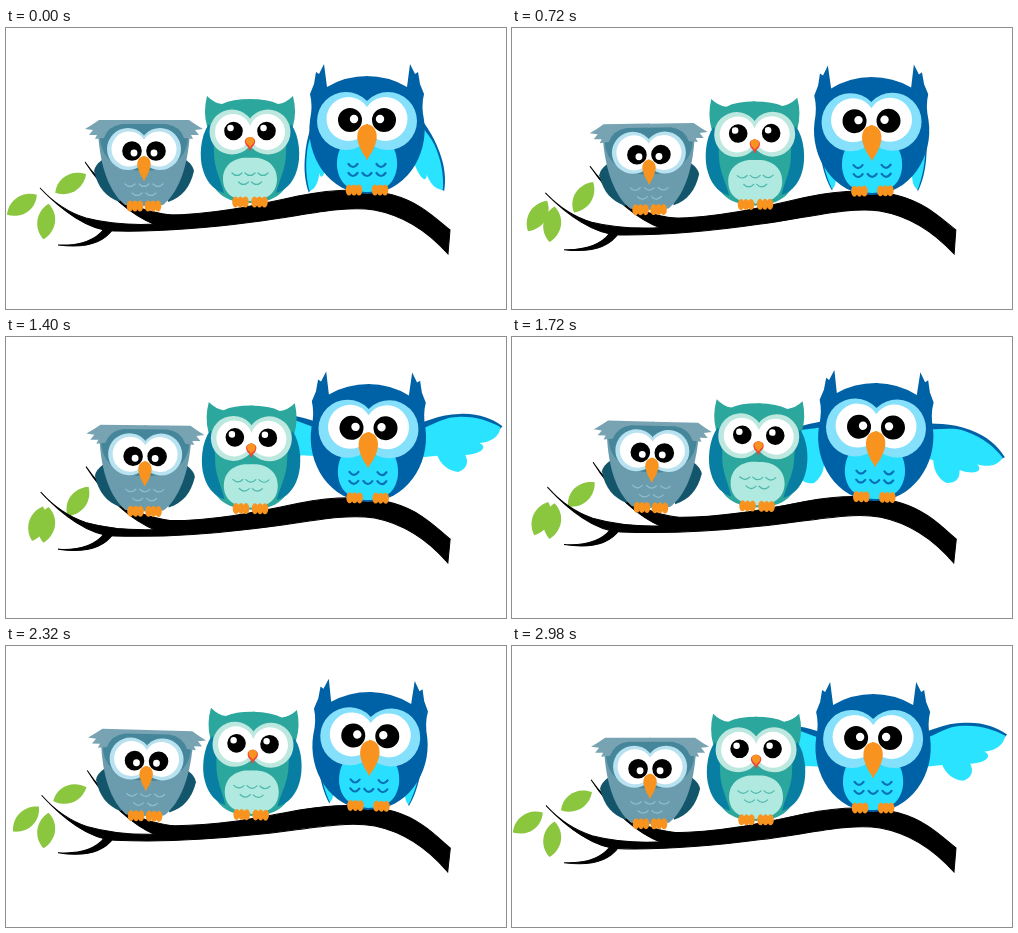
An HTML page that plays this animation: 500x281 px, repeating every 3000 ms.

```html
<!DOCTYPE html>
<html lang="en">
<head>
<meta charset="utf-8">
<title>Owls on a branch</title>
<style>
html, body { margin: 0; width: 100%; height: 100%; overflow: hidden; background: #fff; }
svg { display: block; width: 100vw; height: 100vh; }
</style>
</head>
<body>
<svg viewBox="0 0 500 281">
  <defs>
    <path id="leaf" d="M-18 0C-9-12 8-12 18 0C8 12-9 11-18 0Z" fill="#8bc63f"/>
    <g id="wing">
      <path d="M-10-2C4-6 20-15 40-15C58-16 72-11 83-3L75 6H-10Z" fill="#0062a6"/>
      <path d="M-10 2C8 2 20-12 38-12C56-13 70-8 81-2C80 7 72 13 60 14C68 17 64 25 46 26C50 34 47 40 39 43C29 42 22 36 18 27L-10 30Z" fill="#29e3ff"/>
    </g>
  </defs>
  <g id="leaves"></g>
  <g id="sway">
    <g stroke="#000">
      <path d="M34 160C47 174 61 184 80 190C103 196 130 197 150 196L160 187C205 187 247 178 292 168C326 161 361 160 387 167C413 174 428 189 444 202L442 226C425 207 401 188 368 182C335 177 292 189 247 194C202 200 153 204 108 203C83 203 55 182 34 160Z"/>
      <path d="M79 134C88 147 97 156 110 166C126 179 142 184 165 187L150 197C126 188 100 166 79 134Z"/>
      <path d="M107 201C98 214 82 221 52 217C77 218 91 210 98 201Z"/>
    </g>
    <g id="wingL"><use href="#wing"/></g>
    <g id="wingR"><use href="#wing"/></g>
    <g id="small" transform="translate(138)"></g>
    <g id="middle" transform="translate(244)"></g>
    <g id="big" transform="translate(361)"></g>
  </g>
</svg>
<script>
const LOOP = 3000, TAU = Math.PI * 2;
const AXIS = 361;
const $ = id => document.getElementById(id);

function add(parent, tag, attrs) {
  const el = document.createElementNS("http://www.w3.org/2000/svg", tag);
  for (const key in attrs) el.setAttribute(key, attrs[key]);
  parent.appendChild(el);
  return el;
}
const disc = (g, cx, cy, r, fill) => add(g, "circle", { cx, cy, r, fill });
const shape = (g, d, fill) => add(g, "path", { d, fill });

// Each owl is drawn around x = 0 from right-hand halves
function both(g, d, fill) {
  [1, -1].forEach(side => shape(g, d, fill).setAttribute("transform", `scale(${side} 1)`));
}
function eyes(g, gap, y, r, fill) {
  [-gap, gap].forEach(x => disc(g, x, y, r, fill));
}
function pupils(g, gap, y, r, shineX, shineY) {
  eyes(g, gap, y, r, "#000");
  [-1, 1].forEach(side => disc(g, side * gap + shineX(side), y + shineY, r * 0.35, "#fff"));
}
function arcs(g, count, gap, y, w, h, stroke, width) {
  let d = "";
  for (let i = 0; i < count; i++) {
    d += `M${(i - (count - 1) / 2) * gap - w} ${y}q${w} ${h} ${2 * w} 0`;
  }
  add(g, "path", { d, fill: "none", stroke, "stroke-width": width, "stroke-linecap": "round" });
}
function feet(g, gap, y) {
  for (const side of [-1, 1]) {
    for (const toe of [-5, 0, 5]) {
      add(g, "ellipse", { cx: side * gap + toe, cy: y, rx: 3.3, ry: 5.5, fill: "#f7931e" });
    }
  }
}

function drawSmall(g) {
  both(g, "M42 132Q49 137 50 143C46 160 38 169 24 174L22 148Z", "#13566b");
  both(g, "M-1 97L46 104C44 140 34 165 19 177L-1 178Z", "#6a9cad");
  both(g, "M-1 95H38Q43 97 44 110C43 128 30 143-1 143Z", "#45869b");
  both(g, "M-1 92H45Q52 97 59 101L51 102L55 107L47 107L49 111L40 110Q36 98 22 96H-1Z", "#78a3b3");
  eyes(g, 16, 121, 21, "#b9e2f0");
  eyes(g, 15, 121, 17.5, "#fff");
  pupils(g, 12, 123, 9.8, side => -2 * side, 2);
  both(g, "M-1 128C6 128 8 135 6 140Q4 148-1 153Z", "#f7931e");
  arcs(g, 3, 14, 156, 5, 5, "#8fbdd0", 1.2);
  arcs(g, 2, 14, 165, 5, 5, "#8fbdd0", 1.2);
  feet(g, 9, 178);
}

function drawMiddle(g) {
  both(g, "M-1 71Q18 71 28 76Q36 75 43 68Q47 84 43 98C40 108 41 118 41 137C41 163 26 175-1 175Z", "#2ca79d");
  both(g, "M41 96C50 108 51 130 47 142C43 156 34 163 26 165C30 150 36 140 36 125Q36 108 41 96Z", "#087fa2");
  both(g, "M-1 130C14 128 27 136 27 151C27 165 17 173-1 173Z", "#b0e9e0");
  eyes(g, 18, 104, 22.5, "#bde8df");
  eyes(g, 17, 104, 18, "#fff");
  pupils(g, 16.5, 103, 9.3, () => -3, -3);
  both(g, "M-1 109C6 109 6 114 4 117L-1 123Z", "#f04438");
  both(g, "M-1 109C5 109 5 113 3 116L-1 119Z", "#f7931e");
  arcs(g, 3, 13, 145, 5, 5, "#4db8ac", 1.2);
  arcs(g, 2, 13, 154, 5, 5, "#4db8ac", 1.2);
  feet(g, 9.5, 174);
}

function drawBig(g) {
  both(g, "M-1 48Q22 48 40 59L43 36L48 46L51 44L53 56L57 66Q54 78 57 92C62 128 38 166-1 166Z", "#0062a6");
  both(g, "M-1 109C22 107 31 120 30 139C28 156 17 164-1 164Z", "#29dfff");
  eyes(g, 21, 93, 29, "#85e0fb");
  eyes(g, 18.5, 91, 22, "#fff");
  const open = add(g, "g", {}), shut = add(g, "g", {});
  pupils(open, 17, 92, 12, side => -4 * side, -1);
  eyes(shut, 19, 91, 23, "#fff");
  arcs(shut, 2, 38, 89, 10, -15, "#111", 1.4);
  both(g, "M-1 96C9 97 11 106 9 114Q6 125-1 132Z", "#f7931e");
  arcs(g, 2, 28, 136, 4.5, 6, "#0870b4", 2.2);
  arcs(g, 3, 14, 145, 4.5, 6, "#0870b4", 2.2);
  feet(g, 13, 162);
  return { open, shut };
}

const wave = (t, mid, amp, delay) => mid + amp * Math.sin(TAU * (t - delay) / LOOP);

// Each leaf circles slowly: x, y, angle
const swings = [
  t => [wave(t, 68, 5, 350), wave(t, 159, 11, 150), wave(t, -41, -20, 250)],
  t => [wave(t, 23.5, 8, 600), wave(t, 181, 8.5, 250), wave(t, 127, -20, 600)],
  t => [40, wave(t, 190, 7, -250), 98]
];
const leaves = swings.map(() => add($("leaves"), "use", { href: "#leaf" }));

drawSmall($("small"));
drawMiddle($("middle"));
const { open, shut } = drawBig($("big"));

function wingPose(raise) {
  const spread = Math.min(1, raise / 0.6);
  const angle = 101 - 110 * raise;
  return `translate(51 92) rotate(${angle}) scale(${0.84 + 0.16 * spread} ${0.4 + 0.6 * spread})`;
}

function draw(now) {
  const t = Math.floor(now % LOOP / 20) * 20;
  const turn = wave(t, 0.47, -1.22, -188);
  $("sway").setAttribute("transform", `rotate(${turn} 442 215)`);

  // Wings start half lowered, then flap; the left one trails
  const lift = ((1 - Math.cos(TAU * (t / 395 + 0.02))) / 2) ** 2;
  const raise = Math.max(lift, 0.27 * (1 - t / 80));
  $("wingR").setAttribute("transform", `translate(${AXIS}) ${wingPose(raise)}`);
  $("wingL").setAttribute("transform", `translate(${AXIS}) scale(-1 1) ${wingPose(raise ** 1.5)}`);

  const blink = t >= 300 && t < 480;
  open.setAttribute("visibility", blink ? "hidden" : "visible");
  shut.setAttribute("visibility", blink ? "visible" : "hidden");

  leaves.forEach((leaf, i) => {
    const [x, y, angle] = swings[i](t);
    leaf.setAttribute("transform", `translate(${x} ${y}) rotate(${angle})`);
  });
}

const start = performance.now();
function tick() {
  draw(performance.now() - start);
  requestAnimationFrame(tick);
}
tick();
</script>
</body>
</html>
```
